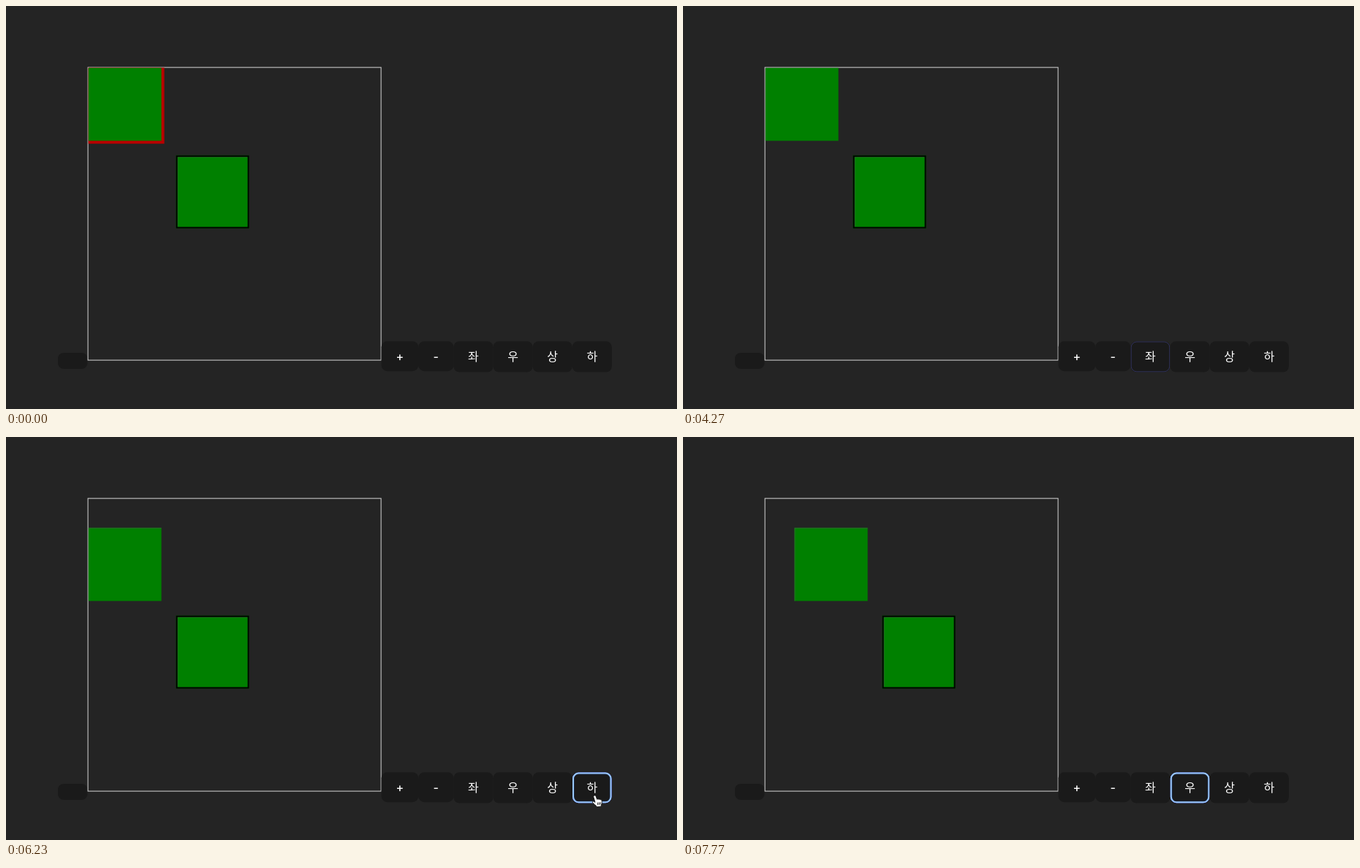
These frames come from a looping animation (918 px wide and 552 px high, 8 s). An HTML page:

```html
<!DOCTYPE html>
<html lang="ko">
<head>
<meta charset="utf-8">
<style>
  html, body { margin: 0; width: 100%; height: 100%; overflow: hidden; background: #242424; }
  svg { display: block; }
  text {
    font: 500 16px Inter, "Noto Sans CJK KR", "Noto Sans CJK", sans-serif;
    fill: #fff;
    text-anchor: middle;
  }
  .key { fill: #1a1a1a; }
  .hover { fill: none; stroke: #646cff; }
  .focus { fill: none; stroke: #99c8ff; stroke-width: 2; }
  .focus-inner { fill: none; stroke: #1c2c4e; }
  .green { fill: #008000; }
  .shine { fill: none; stroke: #2a702a; }
  .red { fill: #b80000; }
</style>
</head>
<body>
<svg id="stage" width="918" height="552" viewBox="0 0 918 552">
  <rect class="key" x="71" y="475" width="40.5" height="22" rx="8"/>
  <rect x="112.1" y="84.1" width="401" height="401" fill="none" stroke="#d8d8d8"/>
  <svg id="pad" x="112.6" y="84.6" width="400" height="400"></svg>
  <g id="keys"></g>
  <path id="hand" transform="translate(801.5 490)" fill="#fff" stroke="#111" stroke-width=".9" stroke-linejoin="round"
    d="M3.2 1.2C4.3 .6 5.2 1.2 5.6 2.2L7.2 6.4C7.6 5.6 9 5.6 9.4 6.5C10 5.8 11.2 6 11.5 6.9C12.4 6.5 13.4 7 13.6 8.1
       C13.9 10.2 14 12.2 12.8 14.2L12.9 15.9L6.7 16.7L6.2 15.4C4.6 14.4 3 12.6 1.2 10.9C.2 9.8 1.4 8.6 2.7 9.3L4.5 10.4
       L2.4 3.3C2.1 2.4 2.4 1.6 3.2 1.2ZM7.7 10.6L8.2 14M9.7 10.4L10.1 13.8M11.6 10.2L11.8 13.4"/>
</svg>
<script>
const LOOP = 8000, TICK = 70, FADE = 250;
const $ = id => document.getElementById(id);
const clamp = v => Math.max(0, Math.min(1, v));

function add(parent, tag, attrs, label = "") {
  const node = document.createElementNS("http://www.w3.org/2000/svg", tag);
  for (const name in attrs) node.setAttribute(name, attrs[name]);
  node.textContent = label;
  parent.append(node);
  return node;
}

const show = (node, on) => node.setAttribute("visibility", on ? "visible" : "hidden");

// Each hover is an [enter, leave] pair in ms.
const keySpecs = [
  { label: "+", x: 513.6, w: 50.6, h: 41, hovers: [] },
  { label: "-", x: 564.2, w: 48.2, h: 41, hovers: [] },
  { label: "좌", x: 612.4, w: 54.1, h: 42.4, hovers: [[4200, 4270]] },
  { label: "우", x: 666.5, w: 54.1, h: 42.4, hovers: [[4270, 4410], [6650, 9000]], focus: [7140, LOOP] },
  { label: "상", x: 720.6, w: 54.1, h: 42.4, hovers: [[4410, 4550], [6440, 6650]] },
  { label: "하", x: 774.7, w: 54.1, h: 42.4, hovers: [[4550, 6440]], focus: [5250, 7140] }
];

function makeKey(spec) {
  const { label, x, w, h } = spec, y = 459.2;
  const box = (cls, inset, rx) => add($("keys"), "rect", {
    class: cls, x: x + inset, y: y + inset, width: w - 2 * inset, height: h - 2 * inset, rx
  });
  box("key", 0, 8);
  const hover = box("hover", .8, 7.5);
  const rings = [box("focus-inner", 2.6, 6), box("focus", 1.3, 7.5)];
  add($("keys"), "text", { x: x + w / 2, y: 485.8 }, label);
  return { ...spec, hover, rings };
}

function makeSquare(at, bordered) {
  const group = add($("pad"), "g", {});
  const red = add(group, "rect", { class: "red", x: -2, y: -2, width: 106, height: 106 });
  add(group, "rect", { class: "green", width: 100, height: 100 });
  const inset = bordered ? 2 : 0;
  const top = add(group, "path", { class: "shine", d: `M${inset} ${inset + .4}H${100 - inset}` });
  const left = add(group, "path", { class: "shine", d: `M${inset + .4} ${inset}V${100 - inset}` });
  if (bordered) add(group, "rect", {
    x: 1, y: 1, width: 98, height: 98, fill: "none", stroke: "#000", "stroke-width": 2
  });
  return { at, group, red, top, left };
}

const keys = keySpecs.map(makeKey);
const squares = [makeSquare(0, false), makeSquare(120, true)];
const downs = [5390, 5740, 6020, 6230];
const rights = [7210, 7420, 7630, 7770];
const reds = [[[0, 560], [1330, 2100]], [[2100, 2800]]];
const within = (t, [from, to]) => t >= from && t < to;
const moved = (t, steps) => 10 * steps.filter(step => t >= step).length;

function glow(t, [enter, leave]) {
  const peak = clamp((Math.min(t, leave) - enter) / FADE);
  return clamp(peak - Math.max(0, t - leave) / FADE);
}

function render(t) {
  const dx = moved(t, rights), dy = moved(t, downs);
  squares.forEach(({ at, group, red, top, left }, i) => {
    group.setAttribute("transform", `translate(${at + dx} ${at + dy})`);
    show(red, reds[i].some(span => within(t, span)));
    show(top, at + dy > 0);
    show(left, at + dx > 0);
  });

  const tick = Math.floor(t / TICK) * TICK;
  for (const { hover, hovers, rings, focus } of keys) {
    hover.setAttribute("opacity", Math.max(0, ...hovers.map(span => glow(tick, span))));
    rings.forEach(ring => show(ring, focus && within(t, focus)));
  }
  show($("hand"), within(t, [5250, 6440]));
}

function frame() {
  render(performance.now() % LOOP);
  requestAnimationFrame(frame);
}
frame();
</script>
</body>
</html>
```
